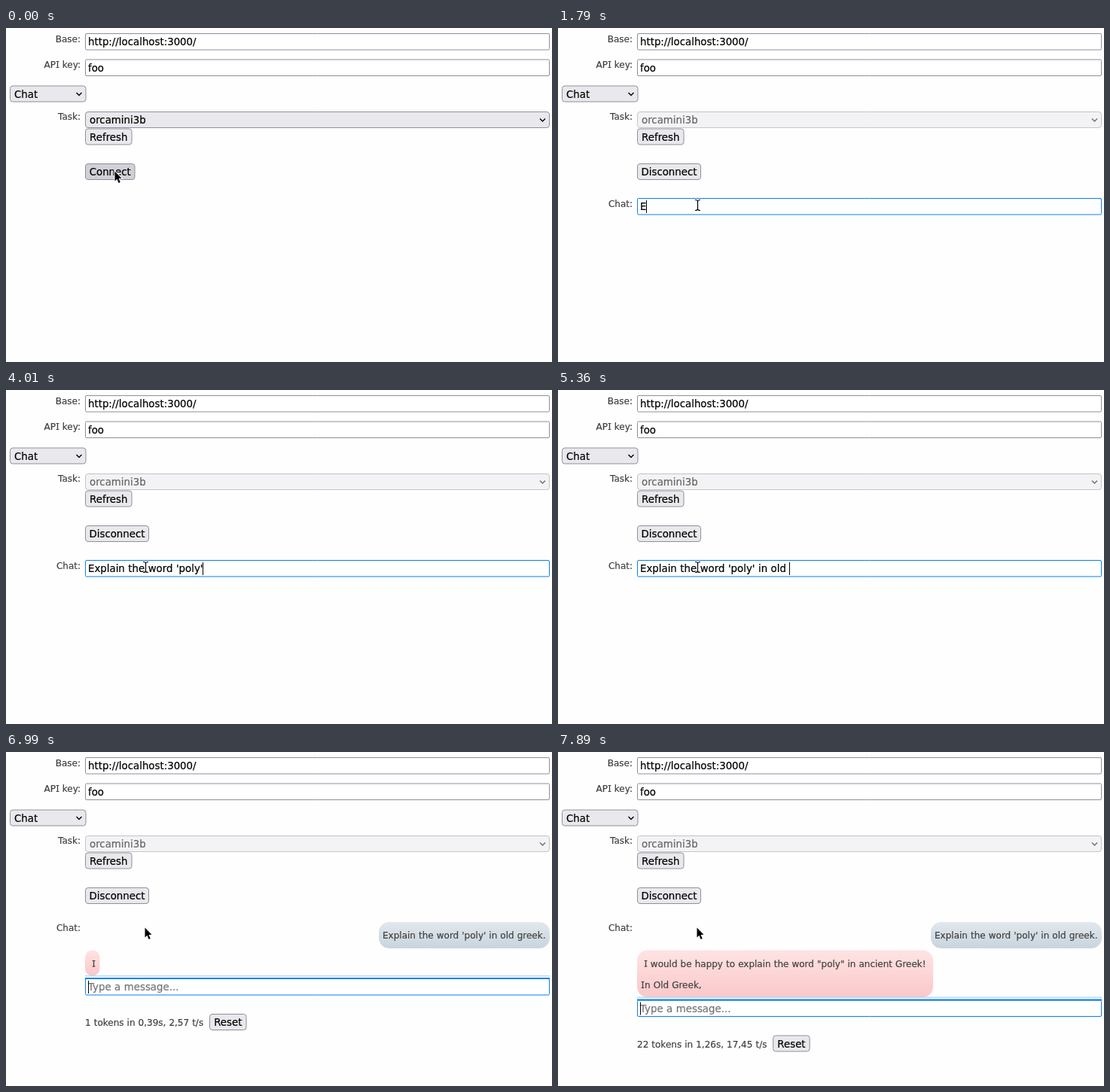
These frames come from a looping animation (725 px wide and 444 px high, 8 s). An HTML page with a canvas:

```html
<!DOCTYPE html>
<html lang="en">
<head>
<meta charset="utf-8">
<title>Chat demo</title>
<style>
  html, body { margin: 0; width: 100%; height: 100%; overflow: hidden; background: #fefefe; }
  canvas { display: block; width: 725px; height: 444px; }
</style>
</head>
<body>
<canvas id="stage" width="725" height="444"></canvas>
<script>
const ctx = document.getElementById("stage").getContext("2d");
const LOOP = 8000;
const UI = 40 / 3, SMALL = 12;
const BLUE = "#0a80f0", GREY = "#8f8f9d", LABEL = "#404040";
const FIELD_X = 105, FIELD_W = 616;
const QUESTION = "Explain the word 'poly' in old greek.";
const ANSWER = ["I", " would", " be", " happy", " to", " explain", " the", " word", ' "', "poly", '"',
  " in", " ancient", " Greek", "!", "\n", "", "In", " Old", " G", "reek", ","];

// Bursts of typing: start, end, steps, first and last character count.
const TYPING = [
  [1790, 2830, 8, 1, 11],
  [2980, 4010, 8, 12.4, 23],
  [4310, 4610, 3, 24, 26],
  [5060, 6100, 8, 28, 37]
];

// Streaming progress: time, tokens, elapsed seconds.
const STREAM = [
  [6990, 1, 0.3895], [7140, 4, 0.51], [7290, 8, 0.68], [7440, 11, 0.81],
  [7590, 15, 0.98], [7740, 19, 1.13], [7890, 22, 1.2605]
];

// Pointer: time, shape, tip or centre.
const POINTER = [
  [0, arrow, 144.5, 190.5], [1040, arrow, 154, 204], [1190, beam, 177, 229],
  [1340, beam, 185.5, 235.5], [6690, arrow, 184.5, 233.5]
];

const latest = (list, t) => list.filter(item => item[0] <= t).pop();

function setFont(size) {
  ctx.font = `${size}px "DejaVu Sans", Verdana, sans-serif`;
  ctx.wordSpacing = `${0.02 * size}px`;
}

// The capital I carries serifs, so it is drawn wider than the font's own.
function textWidth(s, size) {
  setFont(size);
  const parts = s.split("I");
  return parts.reduce((w, p) => w + ctx.measureText(p).width, (parts.length - 1) * 0.42 * size);
}

function serifI(x, y, size) {
  const top = Math.round(y - 0.73 * size), h = y - top;
  ctx.fillRect(x + 0.155 * size, top, 0.11 * size, h);
  ctx.fillRect(x + 0.05 * size, top, 0.32 * size, 1);
  ctx.fillRect(x + 0.05 * size, y - 1, 0.32 * size, 1);
}

function text(s, x, y, size = UI, color = "#000", align = 0) {
  x -= textWidth(s, size) * align;
  ctx.fillStyle = ctx.strokeStyle = color;
  ctx.lineWidth = 0.2;
  s.split("I").forEach((part, i) => {
    if (i) {
      serifI(x, y, size);
      x += 0.42 * size;
    }
    ctx.fillText(part, x, y);
    ctx.strokeText(part, x, y);
    x += ctx.measureText(part).width;
  });
}

const label = (s, y) => text(s, 99, y, SMALL, LABEL, 1);

function box(x, y, w, h, r, fill, stroke) {
  ctx.beginPath();
  ctx.roundRect(x, y, w, h, r);
  ctx.fillStyle = fill;
  ctx.fill();
  if (stroke) {
    ctx.strokeStyle = stroke;
    ctx.lineWidth = 1;
    ctx.stroke();
  }
}

function field(y, border = GREY) {
  box(FIELD_X + 0.5, y + 0.5, FIELD_W, 21.5, 1.5, "#fff", border);
}

function button(s, x, y, w, fill = "#e9e9ed") {
  box(x + 0.5, y + 0.5, w, 21, 3.5, fill, GREY);
  text(s, x + 0.5 + w / 2, y + 16, UI, "#000", 0.5);
}

function select(s, x, y, w, enabled = true) {
  ctx.globalAlpha = enabled ? 1 : 0.5;
  box(x + 0.5, y + 0.5, w, 21, 3.5, "#e9e9ed", GREY);
  ctx.globalAlpha = enabled ? 1 : 0.55;
  text(s, x + 6, y + 16);
  const cx = x + w - 8.5;
  ctx.beginPath();
  ctx.moveTo(cx - 3.5, y + 9.5);
  ctx.lineTo(cx, y + 13);
  ctx.lineTo(cx + 3.5, y + 9.5);
  ctx.strokeStyle = "#000";
  ctx.lineWidth = 1.4;
  ctx.stroke();
  ctx.globalAlpha = 1;
}

function caret(x, y) {
  ctx.fillStyle = "#000";
  ctx.fillRect(Math.floor(x), y, 1, 17);
}

function bubble(x, y, w, h, top, bottom) {
  const shade = ctx.createLinearGradient(0, y, 0, y + h);
  shade.addColorStop(0, top);
  shade.addColorStop(1, bottom);
  box(x, y, w, h, Math.min(14, w / 2), shade);
}

function arrow(x, y) {
  ctx.beginPath();
  ctx.moveTo(x, y);
  for (const [dx, dy] of [[0, 13], [2.9, 10.2], [5.1, 15.4], [7.2, 14.5], [5.1, 9.4], [9, 9.2]]) {
    ctx.lineTo(x + dx, y + dy);
  }
  ctx.closePath();
  ctx.strokeStyle = "#fff";
  ctx.lineWidth = 2;
  ctx.stroke();
  ctx.fillStyle = "#000";
  ctx.fill();
}

function beam(x, y) {
  ctx.beginPath();
  for (const s of [-1, 1]) {
    ctx.moveTo(x - 3.5, y + 7 * s);
    ctx.quadraticCurveTo(x, y + 7 * s, x, y + 5 * s);
    ctx.quadraticCurveTo(x, y + 7 * s, x + 3.5, y + 7 * s);
  }
  ctx.moveTo(x, y - 6);
  ctx.lineTo(x, y + 6);
  for (const [color, width] of [["#fff", 3], ["#000", 1.2]]) {
    ctx.strokeStyle = color;
    ctx.lineWidth = width;
    ctx.stroke();
  }
}

function typedCount(t) {
  const burst = latest(TYPING, t);
  if (!burst) return 0;
  const [start, end, steps, first, last] = burst;
  const gap = (end - start) / (steps - 1);
  const step = Math.min(steps - 1, Math.floor((t - start + 6) / gap));
  return Math.round(first + (last - first) * step / (steps - 1));
}

function drawForm(t) {
  label("Base:", 19);
  field(7);
  text("http://localhost:3000/", 109, 23);
  label("API key:", 53);
  field(41.5);
  text("foo", 109, 58);
  select("Chat", 5, 76.5, 100.5);
  label("Task:", 122);
  select("orcamini3b", FIELD_X, 111, FIELD_W, t < 740);
  button("Refresh", FIELD_X, 133.5, 61.5);
  if (t < 740) button("Connect", FIELD_X, 180, 65.5, t < 600 ? "#d0d0d7" : "#b1b1b9");
  else button("Disconnect", FIELD_X, 180, 84, t < 1040 ? "#d0d0d7" : "#e9e9ed");
}

function drawPrompt(t) {
  const focused = t >= 1490;
  const typed = QUESTION.slice(0, typedCount(t));
  field(226, focused ? BLUE : GREY);
  if (typed) text(typed, 109, 242);
  else text("Type a message...", 109, 242, UI, "#757575");
  const blinkedOff = (t >= 4760 && t < 5060) || t >= 6540;
  if (focused && !blinkedOff) caret(109 + textWidth(typed, UI), 229);
}

function drawAnswer(tokens) {
  const lines = ANSWER.slice(0, tokens).join("").split("\n");
  const twoLines = lines.length > 1;
  const end = 114 + textWidth(lines[0], SMALL) + (twoLines ? 9.5 : 5.5);
  bubble(FIELD_X, 263.5, end - FIELD_X, twoLines ? 62.5 : 34, "#ffe3e3", "#fac8c8");
  text(lines[0], 114, 285.5, SMALL, LABEL);
  if (twoLines) text(lines[1], 110, 314, SMALL, LABEL);
  return twoLines;
}

function drawStats(tokens, seconds, y) {
  const number = n => n.toFixed(2).replace(".", ",");
  const rate = number(tokens / seconds);
  text(`${tokens} tokens in ${number(seconds)}s, ${rate} t/s`, FIELD_X, y + 16, SMALL, LABEL);
  const extraDigits = String(tokens).length + rate.length - 5;
  button("Reset", 270 + extraDigits * 7.6, y, 48.5);
}

function drawConversation(t) {
  bubble(495, 226, 227, 35, "#e2e8ed", "#c8d4dd");
  text(QUESTION, 716.5, 248, SMALL, LABEL, 1);
  const progress = latest(STREAM, t);
  let top = 263;
  if (progress) {
    const [, tokens, seconds] = progress;
    const twoLines = drawAnswer(tokens);
    top = twoLines ? 329.5 : 301;
    drawStats(tokens, seconds, twoLines ? 376.5 : 348);
  }
  field(top, BLUE);
  text("Type a message...", 109, top + 16, UI, "#757575");
  caret(109, top + 3);
  if (progress) {
    ctx.fillStyle = BLUE;
    ctx.fillRect(FIELD_X, top - 1, FIELD_W + 1, 2);
    ctx.fillStyle = "#b5dcf8";
    ctx.fillRect(FIELD_X, top - 4, FIELD_W + 1, 1.5);
  }
}

function draw(t) {
  ctx.fillStyle = "#fefefe";
  ctx.fillRect(0, 0, 725, 444);
  drawForm(t);
  if (t >= 740) {
    label("Chat:", 238);
    if (t < 6690) drawPrompt(t);
    else drawConversation(t);
  }
  const [, shape, x, y] = latest(POINTER, t);
  shape(x, y);
}

const start = performance.now();
function tick() {
  draw((performance.now() - start) % LOOP);
  requestAnimationFrame(tick);
}
tick();
</script>
</body>
</html>
```
